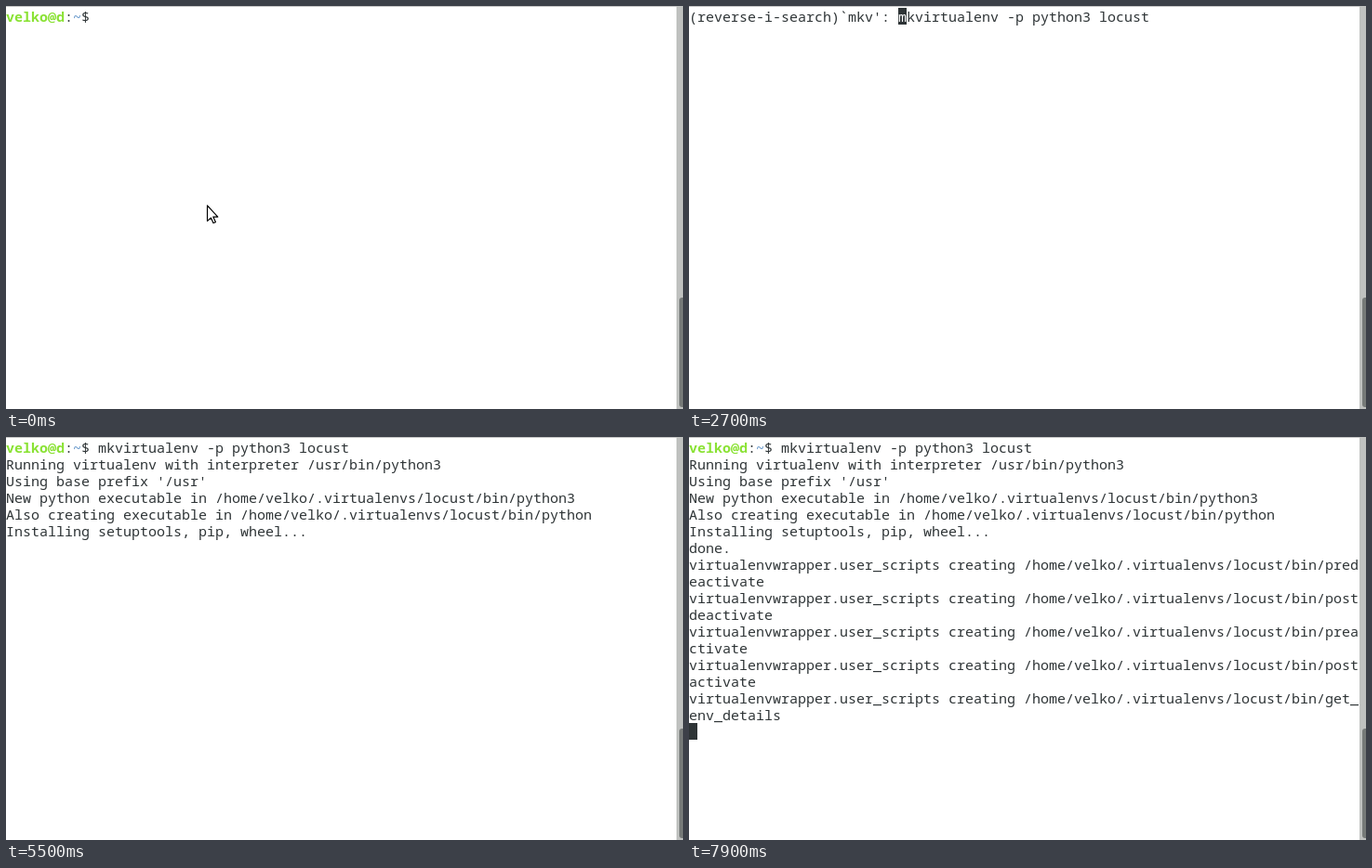
An HTML page for the animation above (8 s loop, 728 by 434 pixels).

```html
<!DOCTYPE html>
<html lang="en">
<head>
<meta charset="utf-8">
<title>Terminal session</title>
<style>
  html, body { margin: 0; width: 100%; height: 100%; overflow: hidden; background: #fff; }
  svg { display: block; }
  text { font: 15px "Noto Sans Mono", "DejaVu Sans Mono", monospace; white-space: pre; fill: #2e3436; }
  .user { font-weight: bold; fill: #8ae234; }
  .path { font-weight: bold; fill: #729fcf; }
</style>
</head>
<body>
<svg width="728" height="434" viewBox="0 0 728 434">
  <rect width="728" height="434" fill="#fff"/>
  <rect width="728" height="1" fill="#c9c9c9"/>
  <rect x="721" width="7" height="434" fill="#bfc1bf"/>
  <rect x="724" y="314" width="8" height="118" rx="3" fill="#767a78"/>
  <g id="screen"></g>
  <rect id="block" width="9" height="18" fill="#2e3436"/>
  <text id="under" style="fill:#fff"></text>
  <path id="arrow" d="M216.5 214.8V231.6L220.3 228.1L223 233.8L225.4 232.7L222.8 227.1H227.8Z"
    fill="#fff" stroke="#000" stroke-width="1.2" stroke-linejoin="round"/>
  <path id="beam" d="M215.5 209.5H217.5L219 211L220.5 209.5H222.5M219 211V224M215.5 225.5H217.5L219 224L220.5 225.5H222.5"
    fill="none" stroke="#000"/>
</svg>
<script>
const LOOP = 8000, CELL = 9, ROW = 18, TOP = 2, COLS = 80;
const USER = "velko";
const PROMPT = USER + "@d:~$ ";
const COMMAND = "mkvirtualenv -p python3 locust";
const ENV = "/home/" + USER + "/.virtualenvs/locust/bin/";

const el = id => document.getElementById(id);
const search = typed => "(reverse-i-search)`" + typed + "': ";
const wrap = line => line.match(new RegExp(".{1," + COLS + "}", "g"));

const entered = [PROMPT + COMMAND];
const created = entered.concat(
  "Running virtualenv with interpreter /usr/bin/python3",
  "Using base prefix '/usr'",
  "New python executable in " + ENV + "python3",
  "Also creating executable in " + ENV + "python");
const installing = created.concat("Installing setuptools, pip, wheel...");
const done = installing.concat("done.");
const scripts = ["predeactivate", "postdeactivate", "preactivate", "postactivate", "get_env_details"];
const finished = done.concat(
  scripts.flatMap(name => wrap("virtualenvwrapper.user_scripts creating " + ENV + name)));

// start time, lines, cursor column, cursor row
const below = (time, lines) => [time, lines, 0, lines.length];
const found = (time, typed) => [time, [search(typed) + COMMAND], search(typed).length, 0];
const screens = [
  [0, [PROMPT], PROMPT.length, 0],
  [2000, [search("")], search("").length, 0],
  found(2400, "mk"),
  found(2700, "mkv"),
  below(3700, entered),
  below(3800, created),
  below(5000, installing),
  below(7700, done),
  below(7900, finished)
];

// cursor is hidden from the first to the second time
const hidden = [[0, 500], [700, 1300], [3200, 3700], [4300, 4900], [5500, 6100], [6700, 7300]];

const colourPrompt = line => line.startsWith(PROMPT)
  ? '<tspan class="user">' + USER + '@d</tspan>:<tspan class="path">~</tspan>' + line.slice(PROMPT.length - 2)
  : line;
const baseline = row => TOP + row * ROW + 15;
const show = (node, on) => node.setAttribute("visibility", on ? "visible" : "hidden");

let current;
function draw(time) {
  const screen = screens.filter(s => s[0] <= time).pop();
  const [, lines, col, row] = screen;
  if (screen !== current) {
    current = screen;
    el("screen").innerHTML = lines.map((line, i) =>
      '<text x="0" y="' + baseline(i) + '">' + colourPrompt(line) + "</text>").join("");
    el("block").setAttribute("x", col * CELL);
    el("block").setAttribute("y", TOP + row * ROW);
    el("under").setAttribute("x", col * CELL);
    el("under").setAttribute("y", baseline(row));
    el("under").textContent = (lines[row] || "").charAt(col);
  }
  const lit = !hidden.some(([from, to]) => time >= from && time < to);
  show(el("block"), lit);
  show(el("under"), lit);
  show(el("arrow"), time < 500);
  show(el("beam"), time >= 500 && time < 1600);
}

const start = performance.now();
function tick(now) {
  draw(Math.max(0, now - start) % LOOP);
  requestAnimationFrame(tick);
}
draw(0);
requestAnimationFrame(tick);
</script>
</body>
</html>
```
